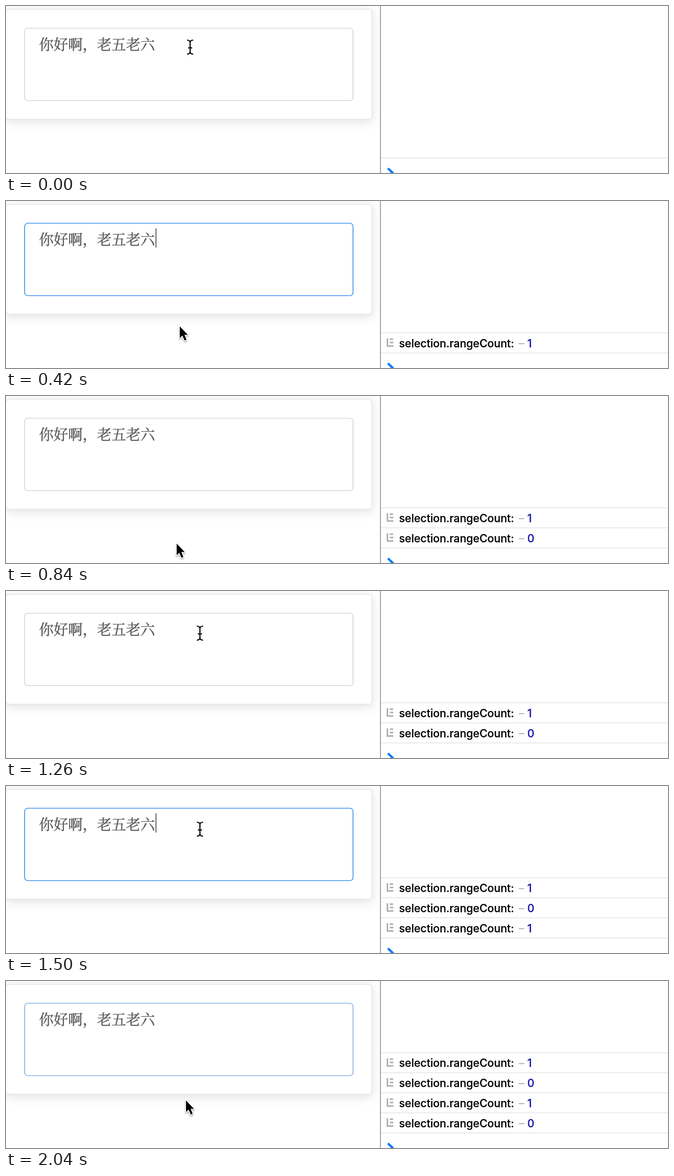
An HTML page for the animation above (2.1 s loop, 1280 by 323 pixels).

```html
<!DOCTYPE html>
<html lang="zh">
<head>
<meta charset="utf-8">
<title>Selection range count</title>
<style>
  html, body { margin: 0; width: 100%; height: 100%; overflow: hidden; background: #fff; }
  svg { display: block; width: 100%; height: 100%; }
  .card { fill: #fff; stroke: #e6e6e8; stroke-width: 1.5; filter: drop-shadow(0 4px 10px rgba(0, 0, 0, .12)); }
  .field { fill: #fff; stroke-width: 1.7; }
  .input { font: 28px "Noto Serif CJK SC", "Noto Sans CJK SC", "Noto Sans CJK", serif; fill: #58595c; stroke: #58595c; stroke-width: .5; }
  .log { font: 450 21px Inter, sans-serif; stroke-width: .25; }
  .rule { stroke: #e4e4e4; stroke-width: 1.5; }
  .icon { fill: none; stroke: #b0b0b0; stroke-width: 3; }
  #arrow { stroke: #fff; stroke-width: 3; stroke-linejoin: round; paint-order: stroke; filter: drop-shadow(0 2px 1.5px rgba(0, 0, 0, .35)); }
</style>
</head>
<body>
<svg viewBox="0 0 1280 323">
  <defs>
    <clipPath id="page"><rect width="723" height="323"/></clipPath>
    <path id="beam" d="M-6-13Q0-13 0-8V9Q0 14-6 14M6-13Q0-13 0-8V9Q0 14 6 14M-4 2H4" fill="none"/>
  </defs>
  <g clip-path="url(#page)">
    <rect class="card" x="-.5" y="6.5" width="708" height="212.5" rx="6"/>
    <rect class="field" id="field" x="36" y="43" width="635" height="140" rx="6"/>
    <text class="input" x="64" y="85">你好啊，老五老六</text>
    <path id="caret" d="M290 53V90" stroke="#444" stroke-width="1.6"/>
  </g>
  <path d="M724 0V323" stroke="#8e8e8e" stroke-width="1.6"/>
  <g id="console"></g>
  <path class="rule" d="M725 293.8H1280"/>
  <path d="M738.5 314L747 322L738.5 330" fill="none" stroke="#0a7aff" stroke-width="4.4"/>
  <g id="ibeam">
    <use href="#beam" stroke="#fff" stroke-width="4.5"/>
    <use href="#beam" stroke="#000" stroke-width="2.2"/>
  </g>
  <path id="arrow" d="M1 1.5V24L6 19.3L10.3 28.8L14 27.2L10 17.8H16.5Z"/>
</svg>
<script>
const LOOP = 2100, STEP = 60, FADE = 120, BLINK = 300, ROW = 38.75;
const GREY = [214, 215, 218], BLUE = [66, 151, 238];

// Each focus or blur logs one line and fades the field's border.
const events = [
  { at: 180, count: 1 }, { at: 720, count: 0 },
  { at: 1320, count: 1 }, { at: 1980, count: 0 }
];

// Pointer hotspot: time, x, y
const path = [
  [0, 356, 79], [240, 356, 79], [420, 335, 241], [600, 329, 284], [840, 329, 284],
  [1200, 375, 80], [1260, 375, 81], [1500, 375, 83], [1740, 347, 229.5], [LOOP, 347, 229.5]
];

const byId = id => document.getElementById(id);
const mix = (a, b, k) => a + (b - a) * k;
const show = (id, on) => byId(id).setAttribute("visibility", on ? "visible" : "hidden");

byId("console").innerHTML = events.map(({ count }) => `
  <g>
    <path class="rule" d="M725 255H1280"/>
    <path class="icon" d="M737.5 265.5V280.5H749M742 267.3H748.5M742 273.8H749"/>
    <text class="log" x="760" y="282.5" stroke="#000">selection.rangeCount:</text>
    <path d="M991.5 276H1002" stroke="#a0a0a0" stroke-width="1.6"/>
    <text class="log" x="1008" y="282.5" fill="#1a1aa6" stroke="#1a1aa6">${count}</text>
  </g>`).join("");
const rows = [...byId("console").children];

function pointerAt(t) {
  const i = path.findIndex(key => key[0] > t);
  const [t0, x0, y0] = path[i - 1], [t1, x1, y1] = path[i];
  const k = (t - t0) / (t1 - t0), eased = k * k * (3 - 2 * k);
  return [mix(x0, x1, eased), mix(y0, y1, eased)];
}

function draw(t) {
  const past = events.filter(event => event.at <= t);
  const last = past[past.length - 1] || { at: -FADE, count: 0 };
  const age = t - last.at, fade = Math.min(1, age / FADE);
  const blue = last.count ? fade : 1 - fade;
  byId("field").setAttribute("stroke", `rgb(${GREY.map((c, i) => mix(c, BLUE[i], blue))})`);
  show("caret", last.count && Math.floor(age / BLINK) % 2 === 0);

  rows.forEach((row, i) => {
    row.setAttribute("visibility", i < past.length ? "visible" : "hidden");
    row.setAttribute("transform", `translate(0 ${-ROW * (past.length - 1 - i)})`);
  });

  const [x, y] = pointerAt(t), inField = y < 184;
  show("ibeam", inField);
  show("arrow", !inField);
  byId(inField ? "ibeam" : "arrow").setAttribute("transform", `translate(${x} ${y})`);
}

const start = performance.now();
function tick() {
  const t = (performance.now() - start) % LOOP;
  draw(Math.floor(t / STEP) * STEP);
  requestAnimationFrame(tick);
}
tick();
</script>
</body>
</html>
```
